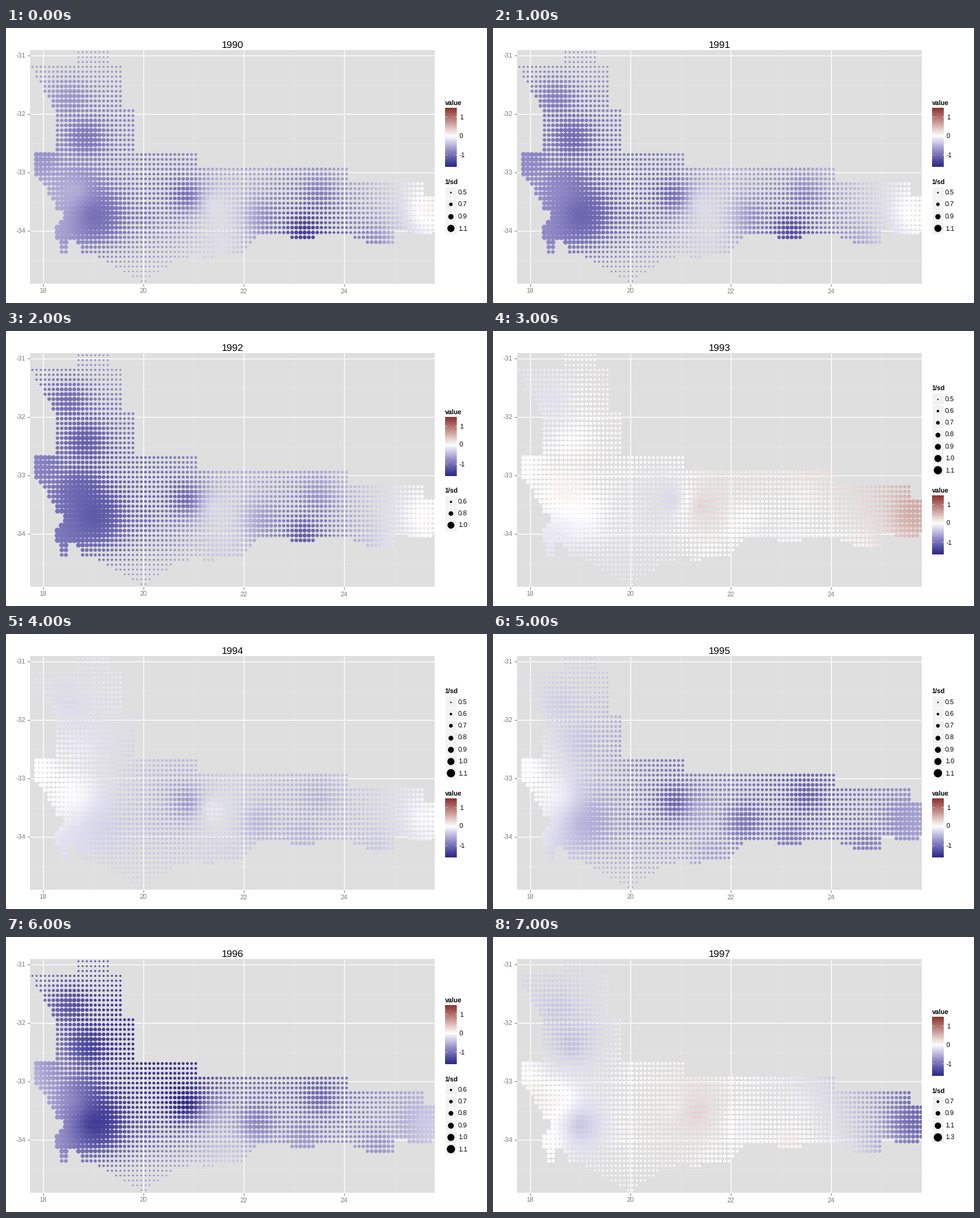
These frames come from a looping animation (700x400 px, 8 s). A matplotlib script:

```python
import numpy as np
import matplotlib.pyplot as plt
from matplotlib.animation import FuncAnimation
from matplotlib.colors import LinearSegmentedColormap, Normalize
from matplotlib.patches import Rectangle

W, H, DPI = 700, 400, 100
PT = 72 / DPI
LEFT, TOP, RIGHT, BOTTOM = 35, 32, 624, 372
GREY = "#7f7f7f"

CMAP = LinearSegmentedColormap.from_list(
    "diverging", ["#322e8c", "#938dc8", "#ffffff", "#c38f89", "#832424"])
NORM = Normalize(-1.65, 1.65)

# Coastline corners as row: column, joined by straight lines
WEST = {0: 11, 2: 11, 3: 0, 12: 6, 20: 6, 21: 1, 25: 1, 31: 6, 32: 6, 33: 8,
        34: 8, 36: 6, 38: 6, 39: 11, 41: 12, 42: 16, 47: 26}
EAST = {0: 18, 2: 18, 3: 21, 11: 21, 12: 24, 20: 24, 21: 39, 23: 39, 24: 75,
        26: 75, 27: 93, 29: 93, 30: 96, 36: 96, 37: 86, 38: 53, 41: 50,
        42: 37, 43: 33, 47: 27}
# Capes cut off from the main land: row, first column, last column
CAPES = [(37, 90, 95), (38, 62, 67), (38, 77, 86), (39, 80, 86),
         (39, 7, 8), (40, 7, 8), (41, 7, 8), (42, 41, 43)]

# Stations: x, y and how strongly they sharpen the estimate around them
STATIONS = np.array([
    (92, 100, 1.3), (114, 160, 1.6), (48, 195, 1.9), (103, 238, 2.4),
    (125, 272, 2.6), (88, 290, 2.4), (165, 80, 0), (200, 190, 0),
    (200, 275, .4), (268, 246, 1.2), (296, 254, 1.1), (315, 320, .9),
    (362, 274, 1.3), (432, 295, 1), (456, 236, 1), (545, 308, 1), (606, 270, 1.9)])
SITES, STRENGTH = STATIONS[:, :2], STATIONS[:, 2]

READINGS = {
    1990: [-.75, -1, -.75, -.6, -1.05, -.7, -.8, -.9, -.95, -1, -.3, -.25,
           -.65, -1.5, -.9, -.75, .03],
    1992: [-1.1, -1.2, -.9, -1.15, -1.25, -1.05, -.8, -1.05, -1.1, -1.05, -.35, -.35,
           -.6, -1.25, -.75, -.3, .02],
    1993: [-.2, 0, -.02, .08, -.03, -.15, .12, 0, -.1, -.25, .3, 0,
           0, -.08, .1, .12, .6],
    1995: [-.35, -.35, .02, -.15, -.5, -.25, -.4, -.8, -.75, -1.15, -.65, -.65,
           -1, -.95, -1.2, -.9, -.7],
    1996: [-1.3, -1.4, -.6, -.95, -1.5, -.9, -1.5, -1.6, -1.25, -1.6, -.75, -.35,
           -.85, -.75, -1.1, -.75, -.4],
    1997: [-.4, -.45, 0, .04, -.4, 0, -.2, 0, .06, .15, .35, .03,
           -.08, .1, -.15, -.4, -1.1],
}
for gap in (1991, 1994):
    READINGS[gap] = np.mean([READINGS[gap - 1], READINGS[gap + 1]], axis=0)

# year: dot size spread, then size keys as first value, step, count, radius range
SPREAD = {1993: .8, 1994: .85, 1995: .9, 1997: .7}
COARSE, FINE = (.5, .2, 4, 1.2, 5.2), (.5, .1, 7, 1, 6)
KEYS = {1990: COARSE, 1991: COARSE, 1992: (.6, .2, 3, 1.6, 5),
        1993: FINE, 1994: FINE, 1995: FINE,
        1996: (.6, .1, 6, 1.7, 6), 1997: (.7, .2, 4, 2, 6)}


def edge(corners, row):
    return int(round(np.interp(row, list(corners), list(corners.values()))))


def land_cells():
    spans = [(row, edge(WEST, row), edge(EAST, row)) for row in range(48)]
    return np.array([(38.4 + 6.096 * col, 35.3 + 7.083 * row)
                     for row, a, b in spans + CAPES for col in range(a, b + 1)])


def distance(p, q):
    return np.linalg.norm(p[:, None] - q[None], axis=2)


def kernel(p, q):
    return np.hypot(distance(p, q), 8)


CELLS = land_cells()
N = len(SITES)
SYSTEM = np.ones((N + 1, N + 1))
SYSTEM[:N, :N] = kernel(SITES, SITES)
SYSTEM[N, N] = 0
BASIS = np.hstack([kernel(CELLS, SITES), np.ones((len(CELLS), 1))])


def surface(readings):
    """Smooth radial interpolation of the readings on every land cell."""
    return BASIS @ np.linalg.solve(SYSTEM, np.append(readings, 0))


def dot_radii():
    """Dots grow near stations and shrink toward the north and south ends."""
    y = CELLS[:, 1]
    base = 2 - .9 * np.clip((y - 300) / 55, 0, 1) - .7 * np.clip((100 - y) / 60, 0, 1)
    bumps = STRENGTH * np.exp(-.5 * (distance(CELLS, SITES) / (12 + 7 * STRENGTH)) ** 2)
    return base + (bumps ** 3).sum(axis=1) ** (1 / 3)


RADII = dot_radii()

plt.rcParams.update({"font.family": "Liberation Sans", "text.hinting": "none"})
fig = plt.figure(figsize=(W / DPI, H / DPI), dpi=DPI, facecolor="white")
ax = fig.add_axes([0, 0, 1, 1])


def label(x, y, s, size=9.6, **kw):
    ax.text(x, y + .36 * size, s, fontsize=size * PT, va="baseline", **kw)


def box(x, y, w, h, color, **kw):
    return ax.add_patch(Rectangle((x, y), w, h, facecolor=color, **kw))


def line(xs, ys, color, width, z=1):
    ax.plot(xs, ys, color=color, lw=width * PT, solid_capstyle="butt", zorder=z)


def dots(x, y, r, **kw):
    return ax.scatter(x, y, s=(2 * np.asarray(r) * PT) ** 2, linewidths=0, zorder=3, **kw)


def draw_panel():
    panel = box(LEFT, TOP, RIGHT - LEFT, BOTTOM - TOP, "#dfdfdf", lw=0, zorder=0)
    for i in range(4):
        x, y = 53.5 + 146.3 * i, 40.3 + 85 * i
        line([x + 73.15] * 2, [TOP, BOTTOM], "#e6e6e6", .8)
        line([LEFT, RIGHT], [y + 42.5] * 2, "#e6e6e6", .8)
        line([x] * 2, [TOP, BOTTOM], "white", 1.2, 2)
        line([LEFT, RIGHT], [y] * 2, "white", 1.2, 2)
        line([x] * 2, [BOTTOM, BOTTOM + 4], GREY, .9)
        line([LEFT - 4, LEFT], [y] * 2, GREY, .9)
        label(x, 382.7, str(18 + 2 * i), 9.8, color=GREY, ha="center")
        label(28.5, y + .5, str(-31 - i), 9.8, color=GREY, ha="right")
    return panel


def draw_bar(top):
    label(638.5, top, "value", weight="bold")
    y0 = top + 7.7
    levels = np.linspace(1.47, -1.65, 20)
    ax.imshow(CMAP(NORM(levels))[:, None, :], extent=(639, 656, y0 + 86, y0),
              aspect="auto", interpolation="bilinear", zorder=2)
    for v in (1, 0, -1):
        y = y0 + 40.6 - 27.5 * v
        line([639, 642.4], [y, y], "white", .5, 3)
        line([652.6, 656], [y, y], "white", .5, 3)
        label(660, y + .3, str(v))


def draw_keys(top, low, step, radii):
    label(638.5, top, "1/sd", weight="bold")
    for i, r in enumerate(radii):
        y = top + 16 + 17.28 * i
        box(638.7, y - 8.64, 17.28, 17.28, "#f2f2f2", edgecolor="white", lw=.6, zorder=1)
        dots([647.3], [y], [r], color="black")
        label(657.8, y + .3, f"{low + step * i:.1f}")


def draw(frame):
    year = 1990 + frame
    ax.clear()
    ax.axis("off")
    panel = draw_panel()
    label(329.7, 24, str(year), 14.4, ha="center")
    spread = SPREAD.get(year, 1)
    r = spread * RADII + 2.4 * (1 - spread)
    land = dots(CELLS[:, 0], CELLS[:, 1], r, c=CMAP(NORM(surface(READINGS[year]))))
    land.set_clip_path(panel)

    low, step, count, r0, r1 = KEYS[year]
    radii = np.linspace(r0, r1, count)
    top = 143.2 - 8.64 * count
    if KEYS[year] is FINE:
        draw_keys(top, low, step, radii)
        draw_bar(top + 27.4 + 17.28 * count)
    else:
        draw_bar(top)
        draw_keys(top + 114.5, low, step, radii)
    ax.set(xlim=(0, W), ylim=(H, 0))
    return []


anim = FuncAnimation(fig, draw, frames=8, interval=1000, init_func=lambda: [],
                     repeat=True, repeat_delay=0)
plt.show()
```
